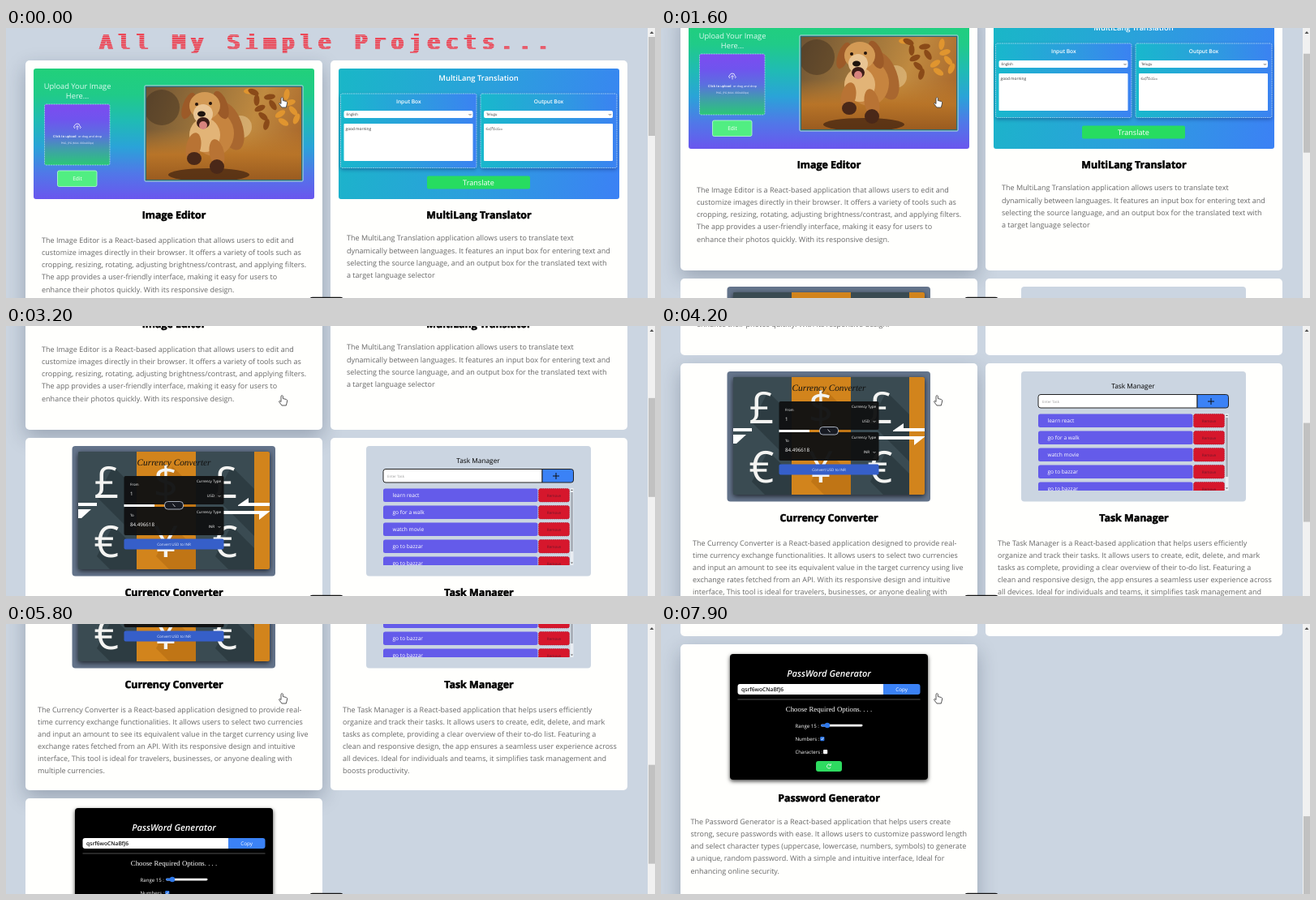
Write an HTML page with a canvas that moves like this. It is 800 by 333 pixels and loops after 8 s.

```html
<!DOCTYPE html>
<html lang="en">
<head>
<meta charset="utf-8">
<title>All My Simple Projects</title>
<style>
  html, body { margin: 0; width: 100%; height: 100%; overflow: hidden; background: #cbd5e1; }
  canvas { display: block; width: 800px; height: 333px; }
</style>
</head>
<body>
<canvas id="stage"></canvas>
<script>
const W = 800, H = 333, LOOP = 8000;
const SANS = '"Open Sans", "Noto Sans", sans-serif';
const SERIF = '"Liberation Serif", serif';
const MONO = '"DejaVu Sans Mono", monospace';
const canvas = document.getElementById('stage');
const dpr = window.devicePixelRatio || 1;
canvas.width = W * dpr;
canvas.height = H * dpr;
const g = canvas.getContext('2d');

// time in ms, scroll position in px
const scrollPath = [[0, 0], [800, 0], [900, 4], [1050, 30], [1250, 42], [1450, 42], [1650, 68],
  [2100, 124], [3200, 233], [4200, 325], [5100, 416], [5300, 417], [5600, 455], [6600, 614],
  [7100, 650], [7900, 677], [LOOP, 677]];

const clamp = v => Math.max(0, Math.min(1, v));

function scrollAt(t) {
  const i = Math.max(1, scrollPath.findIndex(p => p[0] >= t));
  const [t0, s0] = scrollPath[i - 1], [t1, s1] = scrollPath[i];
  return s0 + (s1 - s0) * clamp((t - t0) / (t1 - t0));
}

function box(x, y, w, h, r, fill, stroke, dash = [], line = 0.8) {
  g.beginPath();
  g.roundRect(x, y, w, h, r);
  if (fill) { g.fillStyle = fill; g.fill(); }
  if (stroke) {
    g.strokeStyle = stroke;
    g.lineWidth = line;
    g.setLineDash(dash);
    g.stroke();
    g.setLineDash([]);
  }
}

// y is the middle of the capitals
function text(str, x, y, size, color = '#fff', align = 'left', style = '400', family = SANS) {
  g.font = `${style} ${size}px ${family}`;
  g.textAlign = align;
  g.fillStyle = color;
  g.fillText(str, x, y + size * 0.35);
}

function heading(str, x, y) {
  text(str, x, y, 12.4, '#000', 'center', '700');
  g.strokeStyle = '#000';
  g.lineWidth = 0.55;
  g.strokeText(str, x, y + 12.4 * 0.35);
}

function paragraph(lines, x, y) {
  lines.forEach((line, i) => text(line, x, y + i * 15.1, 9.02, '#686868'));
}

function gradient(x0, y0, x1, y1, ...colors) {
  const grad = g.createLinearGradient(x0, y0, x1, y1);
  colors.forEach((c, i) => grad.addColorStop(i / (colors.length - 1), c));
  return grad;
}

function line(color, width, ...pts) {
  g.beginPath();
  pts.forEach(([x, y]) => g.lineTo(x, y));
  g.strokeStyle = color;
  g.lineWidth = width;
  g.stroke();
}

function shape(color, ...pts) {
  g.beginPath();
  pts.forEach(([x, y]) => g.lineTo(x, y));
  g.fillStyle = color;
  g.fill();
}

function blob(color, x, y, rx, ry, turn = 0) {
  g.beginPath();
  g.ellipse(x, y, rx, ry, turn, 0, 7);
  g.fillStyle = color;
  g.fill();
}

function clipped(x, y, w, h, r, draw) {
  g.save();
  g.beginPath();
  g.roundRect(x, y, w, h, r);
  g.clip();
  draw();
  g.restore();
}

function withShadow(color, blur, dy, draw) {
  g.save();
  g.shadowColor = color;
  g.shadowBlur = blur * dpr;
  g.shadowOffsetY = dy * dpr;
  draw();
  g.restore();
}

function card(x, y, h, hover) {
  const draw = () => box(x, y, 366, h, 5, '#fffffd');
  if (hover > 0) withShadow(`rgba(20,35,60,${0.27 * hover})`, 24, 9, draw);
  else draw();
}

// scan-line lettering, rendered once
const banner = document.createElement('canvas');
banner.width = 600 * dpr;
banner.height = 40 * dpr;
(() => {
  const b = banner.getContext('2d');
  b.scale(dpr, dpr);
  b.font = `400 25px ${MONO}`;
  b.letterSpacing = '7.4px';
  b.fillStyle = '#f03848';
  for (let dx = 0; dx <= 3.5; dx += 0.5) b.fillText('All My Simple Projects...', 1 + dx, 26);
  b.globalCompositeOperation = 'destination-out';
  b.fillStyle = 'rgba(0,0,0,.75)';
  for (let y = 1; y < 40; y += 2.6) b.fillRect(0, y, 600, 0.85);
})();

function dogPhoto() {
  clipped(173, 73, 191, 114, 0, () => {
    g.fillStyle = gradient(173, 73, 364, 150, '#6d5334', '#97703a', '#c08a40', '#a8662a');
    g.fillRect(173, 73, 191, 114);
    g.fillStyle = gradient(0, 125, 0, 187, 'rgba(190,125,45,0)', '#b87428', '#9a5c20');
    g.fillRect(173, 125, 191, 62);
    blob('rgba(232,200,145,.55)', 289, 122, 14, 14);
    blob('rgba(60,45,30,.45)', 192, 98, 22, 22);
    for (let i = 0; i < 14; i++)
      blob(i % 2 ? '#8a4a18' : '#e0952f', 300 + i * 29 % 62, 78 + i * 17 % 44, 7, 3.5, i);
    blob('rgba(70,38,16,.75)', 250, 181, 50, 8);
    blob('#a9672f', 276, 121, 15, 31, -0.35);
    blob('#c6843f', 256, 130, 25, 28);
    blob('#e2b477', 245, 132, 19, 21);
    blob('#b87334', 231, 147, 9, 18, 0.2);
    blob('#b87334', 260, 155, 9, 18, -0.2);
    blob('#4a2818', 232, 161, 9, 8);
    blob('#4a2818', 260, 171, 9, 9);
    blob('#9c5a28', 225, 96, 7, 17, 0.35);
    blob('#9c5a28', 265, 95, 8, 18, -0.35);
    blob('#d39a55', 245, 96, 19, 17);
    blob('#e9c594', 243, 106, 12, 12);
    blob('#3c1d17', 243, 117, 8, 7);
    blob('#d8837e', 243, 120, 5, 5);
    blob('#1d130e', 241, 106, 5, 3.5);
    blob('#24140c', 235, 94, 2, 2);
    blob('#24140c', 252, 93, 2, 2);
  });
}

function imageEditor() {
  box(34, 50, 346, 161, 3, gradient(0, 50, 0, 211, '#21d07a', '#20cb88', '#20bbb4', '#2aa3d8', '#5078e8', '#6a56ee'));
  text('Upload Your Image', 88, 72, 9.3, '#dcfbef', 'center');
  text('Here...', 88, 83.5, 9.3, '#dcfbef', 'center');
  box(47.5, 94, 80.5, 75, 2, gradient(0, 94, 0, 169, '#7d4cf0', '#6f54ee', '#5b6fe0', '#3fa0a8', '#2bc777'),
    '#a9d8e8', [2, 1]);
  line('#fff', 0.8, [85, 124], [83.5, 122], [85, 119.5], [87, 118], [90, 118.5], [91, 121], [92.5, 122.5], [91, 124]);
  line('#fff', 0.8, [86, 122.5], [88, 120.5], [90, 122.5]);
  line('#fff', 0.8, [88, 121], [88, 125.5]);
  text('Click to upload', 58, 134, 4, '#fff', 'left', '600');
  text('or drag and drop', 118, 134, 3.7, '#fff', 'right');
  text('PNG, JPG (MAX. 800x400px)', 88, 141.5, 3.2, '#e6e6ff', 'center');
  box(63.5, 176, 48.5, 19.5, 2, '#51ee82', '#b9ffd2');
  text('Edit', 88, 186, 6.6, '#fff', 'center');
  box(171, 71, 195, 118, 1, '#2a6a75', '#b5e3e6', [], 1);
  dogPhoto();
}

function translatorPane(x, w, title, lang, words, ink) {
  withShadow('rgba(10,40,110,.5)', 5, 2, () =>
    box(x, 81, w, 91.5, 2, gradient(x, 0, x + w, 0, '#18b8cc', '#2ba0dc', '#3b82f2')));
  box(x, 81, w, 91.5, 2, null, 'rgba(205,238,255,.75)', [2, 0.7]);
  text(title, x + w / 2, 91, 6.6, '#fff', 'center', '600');
  box(x + 4, 102, 159, 9, 2, '#fff');
  text(lang, x + 7, 106.5, 4.4, '#333');
  line('#333', 0.7, [x + 158, 106], [x + 159.5, 107.5], [x + 161, 106]);
  box(x + 4, 118, 159, 46, 1, '#fff');
  text(words, x + 6, 124, 4.8, ink);
}

function translator() {
  box(410, 50, 346, 161, 3, gradient(410, 80, 756, 180, '#1ab6c8', '#2ba0dc', '#3b82f4'));
  text('MultiLang Translation', 582.5, 62, 9.4, '#fff', 'center', '600');
  translatorPane(412.5, 167.5, 'Input Box', 'English', 'good morning', '#333');
  translatorPane(585, 168, 'Output Box', 'Telugu', 'శుభోదయం', '#777');
  box(519, 182.5, 127, 16, 2, '#27dc60');
  text('Translate', 582.5, 190.5, 9.1, '#fff', 'center');
}

function exchangeArrows(x, y) {
  shape('#fff', [x, y - 4], [x + 13, y - 13], [x + 13, y - 7], [x + 60, y - 7], [x + 60, y - 3], [x, y - 3]);
  shape('#fff', [x - 20, y + 3], [x + 40, y + 3], [x + 26, y + 14], [x + 26, y + 7], [x - 20, y + 7]);
}

function moneyRow(y, label, amount, code) {
  box(145.5, y, 123, 35, 2, 'rgba(16,17,18,.96)');
  text(label, 153, y + 10.5, 4.4);
  text(amount, 153, y + 21.5, 6.2);
  text('Currency Type', 265, y + 6.5, 4.5, '#fff', 'right');
  text(code, 257, y + 24.5, 4.6, '#fff', 'right');
  line('#ddd', 0.7, [261.5, y + 24], [263, y + 25.5], [264.5, y + 24]);
}

function currency() {
  box(81.5, 381, 250.5, 160.5, 4, '#64748b');
  withShadow('rgba(0,0,0,.7)', 6, 2, () => box(89, 388, 236, 145, 2, '#37474f'));
  clipped(89, 388, 236, 145, 2, () => {
    const columns = [124, 197, 270];
    columns.forEach((x, i) => {
      clipped(x - 36, 388, 73, 145, 0, () => {
        g.fillStyle = i === 1 ? '#d2841c' : '#3a4b52';
        g.fillRect(x - 36, 388, 73, 145);
        for (const y of [425, 498])
          shape(i === 1 ? 'rgba(150,85,5,.3)' : 'rgba(20,32,37,.35)',
            [x - 12, y + 19], [x + 8, y - 19], [x + 60, y + 33], [x + 60, y + 91]);
      });
    });
    g.fillStyle = '#d2841c';
    g.fillRect(306, 388, 19, 145);
    ['£', '$', '£', '€', '¥', '€'].forEach((sign, i) =>
      text(sign, columns[i % 3], i < 3 ? 426 : 499, 54, '#f4f4f2', 'center'));
    exchangeArrows(286, 458);
    shape('#fff', [89, 451], [112, 451], [112, 455], [89, 455]);
    shape('#fff', [89, 459], [105, 459], [93, 470], [89, 470]);
  });
  text('Currency Converter', 207, 401.5, 11.3, '#111', 'center', 'italic 400', SERIF);
  moneyRow(418, 'From', '1', 'USD');
  moneyRow(456, 'To', '84.496618', 'INR');
  shape('#fff', [145.5, 453], [183, 453], [183, 456], [145.5, 456]);
  box(195.5, 449.5, 23, 9.5, 4, '#171a22', '#cfd6e6');
  line('#fff', 0.7, [205.5, 452.5], [208.5, 456]);
  box(145.5, 495.5, 123, 13, 2, '#365fc9');
  text('Convert USD to INR', 207, 502, 4.6, '#e8eeff', 'center');
}

function tasks() {
  box(444, 381, 277, 160.5, 4, '#cbd5e1');
  text('Task Manager', 582, 399.5, 8.3, '#000', 'center');
  box(465, 409.5, 196, 16.5, [3, 0, 0, 3], '#fff', '#222', [], 1);
  text('Enter Task', 470, 418, 4.4, '#999');
  box(661, 409.5, 38.5, 16.5, [0, 3, 3, 0], '#3b82f6', '#222', [], 1);
  line('#111', 1, [674, 418], [682, 418]);
  line('#111', 1, [678, 414], [678, 422]);
  clipped(460, 430, 242, 98, 0, () => {
    ['learn react', 'go for a walk', 'watch movie', 'go to bazzar', 'go to bazzar'].forEach((task, i) => {
      const y = 433.5 + i * 21;
      box(465, y, 190.5, 16.5, 2.5, '#645bea');
      text(task, 476.5, y + 8.5, 6.6);
      box(656.5, y, 38, 16.5, 2.5, '#d6172c', '#a9142a', [1.5, 1], 0.6);
      text('Remove', 675.5, y + 8.5, 4.6, '#70182a', 'center');
    });
    box(695.5, 433, 4, 95, 0, '#e9edf2');
    box(696, 438, 3, 73, 0, '#aab1ba');
    shape('#555', [696, 436], [697.5, 434.5], [699, 436]);
    shape('#555', [696, 524.5], [697.5, 526], [699, 524.5]);
  });
}

function passwords() {
  withShadow('rgba(0,0,0,.75)', 5, 2, () => box(85, 714, 244, 155, 4, '#000'));
  text('PassWord Generator', 207, 738.5, 11.1, '#fff', 'center', 'italic 600');
  box(94.5, 751, 180, 13, [3, 0, 0, 3], '#fff');
  text('qsrf6woCNaBfJ6', 99, 757.5, 6.7, '#111', 'left', '600');
  box(274, 751, 45.5, 13, [0, 3, 3, 0], '#3b82f6');
  text('Copy', 296.5, 757.5, 6.3, '#fff', 'center');
  line('#666', 0.8, [94.5, 770], [319.5, 770]);
  text('Choose Required Options. . . .', 207, 782, 8.8, '#fff', 'center', '400', SERIF);
  text('Range 15 :', 165.5, 802.5, 6.1);
  box(197, 800.7, 51.5, 2.8, 1.4, '#fff');
  box(197, 800.7, 8, 2.8, 1.4, '#2f78e8');
  blob('#2f78e8', 205, 802, 3.2, 3.2);
  text('Numbers :', 165.5, 819, 6.1);
  box(196.2, 816, 5.2, 5.2, 1, '#2f78e8');
  line('#fff', 0.8, [197.3, 818.6], [198.4, 819.8], [200.3, 817.3]);
  text('Characters :', 165.5, 835, 6.1);
  box(200, 832, 5.2, 5.2, 1, '#fff');
  box(191, 846, 32, 13, 3, '#2edb60');
  g.beginPath();
  g.arc(207, 852.5, 2.5, 0.5, 5.4);
  g.strokeStyle = '#fff';
  g.lineWidth = 0.8;
  g.stroke();
  line('#fff', 0.8, [209.5, 849.4], [209.3, 851.4], [207.4, 851.2]);
}

function pageText() {
  heading('Image Editor', 207, 230.5);
  paragraph(['The Image Editor is a React-based application that allows users to edit and',
    'customize images directly in their browser. It offers a variety of tools such as',
    'cropping, resizing, rotating, adjusting brightness/contrast, and applying filters.',
    'The app provides a user-friendly interface, making it easy for users to',
    'enhance their photos quickly. With its responsive design.'], 44, 262);
  heading('MultiLang Translator', 583, 230.5);
  paragraph(['The MultiLang Translation application allows users to translate text',
    'dynamically between languages. It features an input box for entering text and',
    'selecting the source language, and an output box for the translated text with',
    'a target language selector'], 420, 259.3);
  heading('Currency Converter', 207, 561.3);
  paragraph(['The Currency Converter is a React-based application designed to provide real-',
    'time currency exchange functionalities. It allows users to select two currencies',
    'and input an amount to see its equivalent value in the target currency using live',
    'exchange rates fetched from an API. With its responsive design and intuitive',
    'interface, This tool is ideal for travelers, businesses, or anyone dealing with',
    'multiple currencies.'], 39, 592.5);
  heading('Task Manager', 583, 561.3);
  paragraph(['The Task Manager is a React-based application that helps users efficiently',
    'organize and track their tasks. It allows users to create, edit, delete, and mark',
    'tasks as complete, providing a clear overview of their to-do list. Featuring a',
    'clean and responsive design, the app ensures a seamless user experience across',
    'all devices. Ideal for individuals and teams, it simplifies task management and',
    'boosts productivity.'], 415, 592.5);
  heading('Password Generator', 207, 892);
  paragraph(['The Password Generator is a React-based application that helps users create',
    'strong, secure passwords with ease. It allows users to customize password length',
    'and select character types (uppercase, lowercase, numbers, symbols) to generate',
    'a unique, random password. With a simple and intuitive interface, Ideal for',
    'enhancing online security.'], 36.5, 921);
}

function pointer() {
  g.beginPath();
  g.moveTo(339, 92);
  g.lineTo(339, 86.5);
  g.quadraticCurveTo(340.2, 84.6, 341.4, 86.5);
  g.lineTo(341.4, 89.5);
  g.lineTo(345.5, 90.5);
  g.quadraticCurveTo(347, 91, 346.6, 93);
  g.lineTo(345.3, 98);
  g.lineTo(340, 98);
  g.lineTo(336.6, 93.5);
  g.quadraticCurveTo(336.6, 91.4, 339, 93.5);
  g.closePath();
  g.fillStyle = '#fff';
  g.fill();
  g.strokeStyle = '#444';
  g.lineWidth = 0.9;
  g.stroke();
}

function scrollbar(s) {
  g.fillStyle = '#f1f1f1';
  g.fillRect(791, 0, 9, H);
  g.fillStyle = '#c1c1c1';
  g.fillRect(792, 11 + s * 0.334, 8, 122);
  shape('#505050', [793.5, 7], [796, 4], [798.5, 7]);
}

function draw(t) {
  const s = Math.round(scrollAt(t));
  const hover = (top, bottom) => clamp((s - top + 91) / 25) * clamp((bottom - 66 - s) / 25);
  g.setTransform(dpr, 0, 0, dpr, 0, 0);
  g.textRendering = 'geometricPrecision';
  g.fillStyle = '#cbd5e1';
  g.fillRect(0, 0, W, H);
  g.save();
  g.translate(0, -s);
  g.drawImage(banner, 113, 0, 600, 40);
  card(24, 40, 321, hover(40, 361));
  card(24, 371, 321, hover(371, 692));
  card(24, 702, 322, hover(702, 1024));
  card(400, 40, 321, 0);
  card(400, 371, 321, 0);
  imageEditor();
  translator();
  currency();
  tasks();
  passwords();
  pageText();
  g.restore();
  scrollbar(s);
  box(374, 331.7, 42, 10, 4, '#151515');
  pointer();
}

const start = performance.now();
function tick() {
  draw((performance.now() - start) % LOOP);
  requestAnimationFrame(tick);
}
tick();
</script>
</body>
</html>
```
